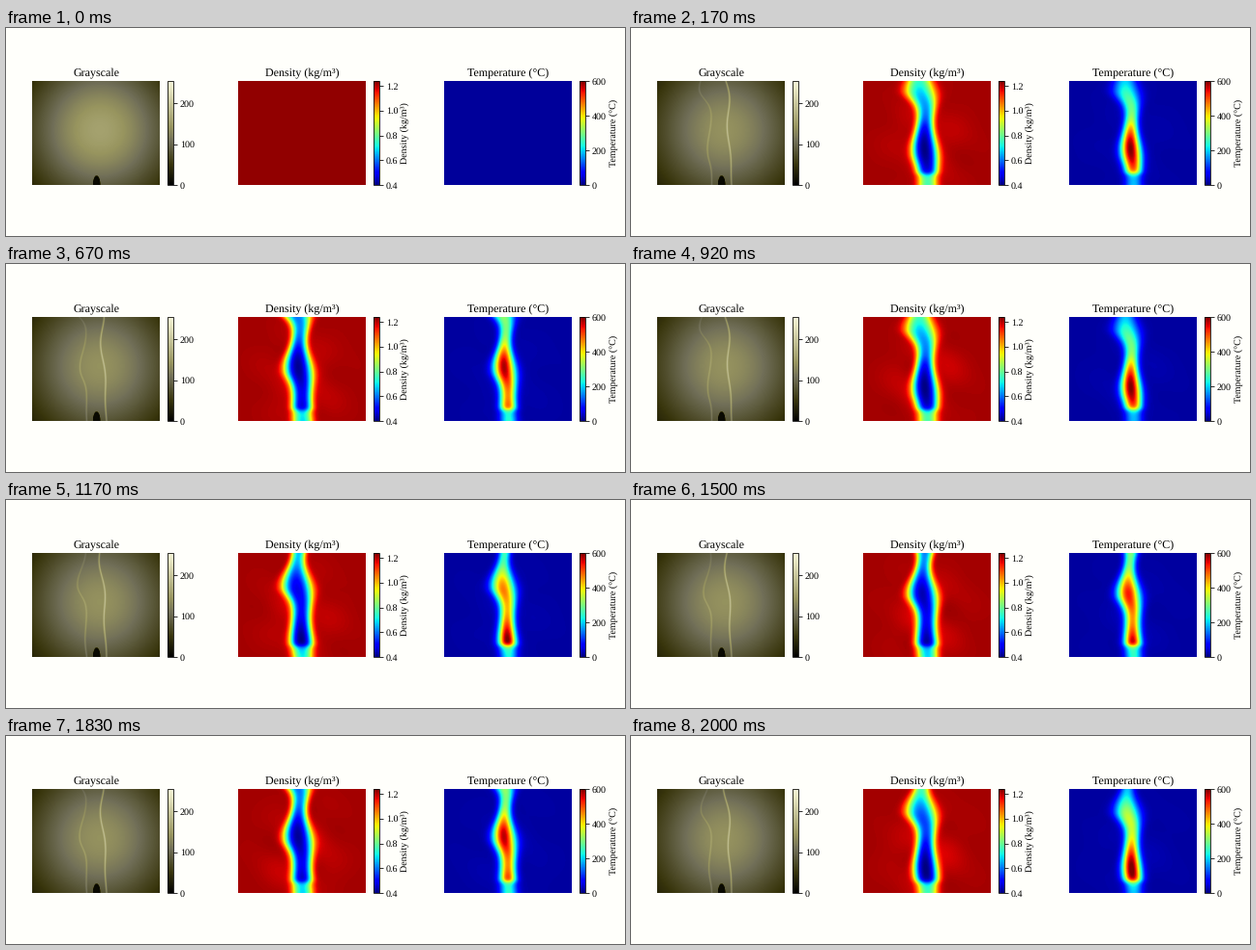
Animation, 640 px wide and 216 px high, one loop 2.08 s. Source, as a matplotlib script:

```python
import numpy as np
import matplotlib.pyplot as plt
from matplotlib.animation import FuncAnimation
from matplotlib.colors import LinearSegmentedColormap

W, H, DPI = 640, 216, 72
PW, PH = 132, 108          # panel size in pixels
TICK, FRAMES, FPS = 20, 104, 12
WAVE, SPEED = 67, 14.6     # bulge spacing and rise per step, in pixels
AMBIENT = 15.0

plt.rcParams.update({"font.family": "Liberation Serif", "font.size": 10,
                     "text.hinting": "none"})
OLIVE = LinearSegmentedColormap.from_list("olive", [
    (0, "#000000"), (0.2, "#38350c"), (0.42, "#716f58"),
    (0.56, "#98955f"), (1, "#f8f7d8")])

x, y = np.arange(PW) + 0.5, np.arange(PH) + 0.5
X, Y = np.meshgrid(x, y)
RISE = 1 - y / PH          # 0 at the nozzle, 1 at the panel top


def wave(d):
    return np.cos(2 * np.pi * d / WAVE)


def plume(step):
    """Left edge, right edge and core temperature for every row."""
    phase = (106 - SPEED * step) % WAVE
    bulge = np.zeros(PH)
    for n in (-1, 0, 1):
        d = y - phase - n * WAVE
        bulge += np.exp(-(d / np.where(d < 0, 22, 14)) ** 2)
    left = 56.5 - 14 * RISE * bulge
    right = 77 - RISE * (5.5 + 3 * wave(y - phase + 25))

    # hot spots ride below the bulges; the top cools as a bulge leaves
    core = 250 + 290 * (1 - np.exp(-(y / 40) ** 2))
    core += 80 * np.minimum(1, y / 40) * wave(y - phase + 8)
    core -= 70 * wave(phase - 18) * RISE ** 2
    core *= 1 - 0.6 / (1 + np.exp((96 - y) / 1.5))
    return left, right, core


def temperature(step):
    if step == 0:
        return np.full((PH, PW), AMBIENT)
    left, right, core = plume(step)
    mid, half = (left + right) / 2, (right - left) / 2
    s = np.abs(X - mid[:, None]) / half[:, None]
    # slow, faint mottling of the warm air beside the plume
    noise = (np.sin(X / 11 + 0.5 * step) * np.sin(Y / 13 + 0.9 * step)
             + np.sin(X / 17 - Y / 9 + 0.7 * step))
    near = np.exp(-((X - 66) / 38) ** 2 - ((Y - 65) / 45) ** 2)
    base = 18 + near * (6 + 4 * noise)
    return base + (core[:, None] - base) * np.exp(-1.4 * s ** 2.2)


def density(temp):
    return 353 / (temp + 273)


def shadow(step):
    r2 = (X - 70) ** 2 + (Y - 51) ** 2
    img = 157 * np.exp(-r2 / 78 ** 2)
    if step:
        left, right, _ = plume(step)
        img *= 0.89
        for edge, gain in ((left, 28 - 14 * RISE), (right, 48 + 0 * RISE)):
            img += gain[:, None] * np.exp(-((X - edge[:, None]) / 0.9) ** 2)
    nozzle = ((X - 66.7) / 4) ** 2 + ((Y - 108) / 10) ** 2
    cover = np.clip((1.1 - nozzle) / 0.3, 0, 1)
    return img * (1 - cover) + 10 * cover


fig = plt.figure(figsize=(W / DPI, H / DPI), dpi=DPI, facecolor="#fffffb")


def panel(i, title, cmap, lo, hi, step, label=""):
    left = round(26.7 + i * W / 3)
    ax = fig.add_axes([left / W, 53 / H, PW / W, PH / H])
    im = ax.imshow(np.zeros((PH, PW)), cmap=cmap, vmin=lo, vmax=hi, aspect="auto")
    ax.set_title(title)
    ax.axis("off")
    cax = fig.add_axes([(left + 140.4) / W, 53 / H, 5.4 / W, PH / H])
    bar = fig.colorbar(im, cax=cax, ticks=np.arange(lo, hi + step / 9, step))
    bar.set_label(label)
    return im


gray = panel(0, "Grayscale", OLIVE, 0, 255, 100)
dens = panel(1, "Density (kg/m³)", "jet", 0.4, 1.24, 0.2, "Density (kg/m³)")
heat = panel(2, "Temperature (°C)", "jet", 0, 600, 200, "Temperature (°C)")


def update(i):
    step = (TICK * i + 15) * FPS // 1000
    temp = temperature(step)
    gray.set_data(shadow(step))
    dens.set_data(density(temp))
    heat.set_data(temp)
    return gray, dens, heat


anim = FuncAnimation(fig, update, frames=FRAMES, interval=TICK,
                     repeat=True, repeat_delay=0)
plt.show()
```
